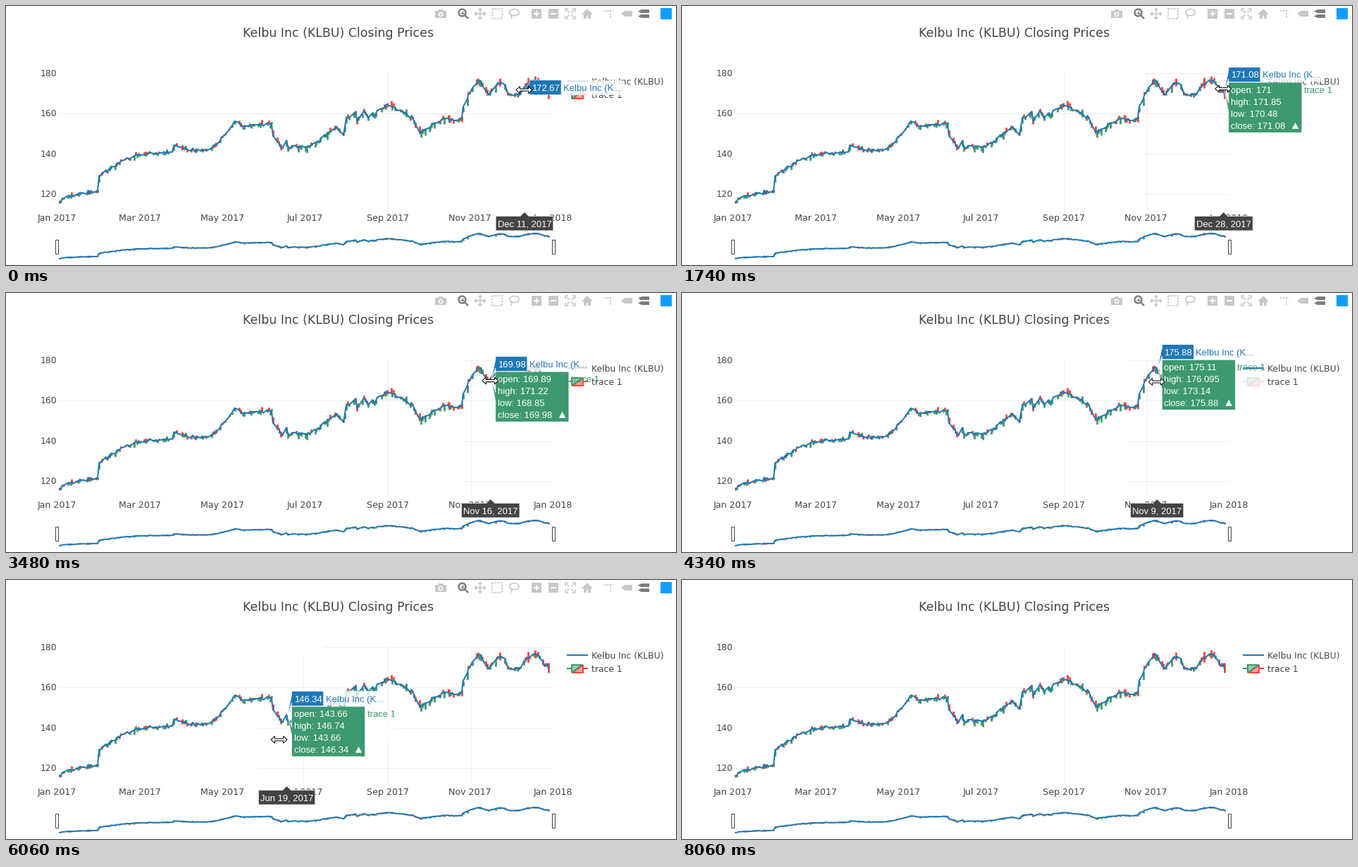
Animation of 951 by 369 pixels, one loop 8.54 s. Source, as a matplotlib script:

```python
import itertools

import matplotlib.pyplot as plt
import numpy as np
from matplotlib.animation import FuncAnimation
from matplotlib.collections import LineCollection, PolyCollection
from matplotlib.lines import Line2D
from matplotlib.patches import Polygon

W, H, DPI = 951, 369, 64
PX = 72 / DPI  # points per pixel
LOOP, TICK, STEP = 8540, 20, 145
FADE_START = 7480
COMPANY = "Kelbu Inc (KLBU)"
BLUE, GREEN, RED, INK = "#1f77b4", "#3d9970", "#ff4136", "#444444"
GRID, PALE, DARK = "#eeeeee", "#c7c7c7", "#7c7c7c"

# Main turns of the closing price: (day of the year, price)
TURNS = [
    (2, 116), (8, 119), (30, 121.5), (31, 128.7), (44, 135), (59, 139.4),
    (85, 140.8), (86, 143.8), (104, 141), (117, 144), (131, 156), (137, 153.3),
    (158, 154.8), (159, 149), (166, 142.6), (186, 143.2), (206, 153.2),
    (211, 149), (213, 157), (220, 160.5), (221, 155.8), (226, 161.2),
    (229, 157.5), (243, 164), (261, 158.6), (267, 150.6), (285, 157),
    (298, 157), (299, 163), (306, 172.5), (311, 176), (318, 169.2),
    (325, 175), (330, 174), (332, 169.5), (341, 169.2), (344, 172.67),
    (351, 176.42), (355, 175), (359, 170.6), (362, 169.2),
]
# Quotes the pointer rests on: open, high, low, close
QUOTES = {
    9: (118.77, 119.38, 118.3, 119.11),
    169: (143.66, 146.74, 143.66, 146.34),
    312: (175.11, 176.095, 173.14, 175.88),
    361: (171, 171.85, 170.48, 171.08),
}
# Pointer sweeps: start, end, day reached, whether the candle label shows
SWEEPS = [
    (0, 0, 344, False), (1180, 1740, 361, True), (2630, 2880, 351, False),
    (3030, 3640, 311, True), (3790, 3790, 312, True), (4490, 5350, 215, True),
    (5480, 5780, 169, True), (6200, 6890, 9, True), (7050, 7050, 2, True),
]


def day_x(day):
    return 72.25 + 1.928 * day


def price_y(price):
    return 95 + (180 - price) * 2.878


def slider_y(price):
    return 324 + (176.4 - price) * 0.594


def make_quotes():
    rng = np.random.default_rng(4)
    days = np.array([d for d in range(2, 363) if d % 7 not in (0, 6)])
    turn_days, turn_prices = zip(*TURNS)
    close = np.interp(days, turn_days, turn_prices)
    close += rng.normal(0, 0.45, len(days)) * ~np.isin(days, turn_days)
    change = np.diff(close, prepend=close[0])
    spread = 0.5 + 0.5 * days / 362
    opening = close - 0.4 * change + rng.normal(0, 1, len(days)) * spread
    reach = abs(rng.normal(0, 0.8, (2, len(days)))) * spread
    high = np.maximum(opening, close) + reach[0]
    low = np.minimum(opening, close) - reach[1]
    table = np.round(np.column_stack([opening, high, low, close]), 2)
    for day, quote in QUOTES.items():
        table[days == day] = quote
    return days, table


def make_poses():
    """Stepwise pointer stops: (time, row of the quote, candle label shown)."""
    poses, last = [], SWEEPS[0][2]
    for start, end, goal, candle in SWEEPS:
        count = round((end - start) / STEP) + 1
        for i, time in enumerate(np.linspace(start, end, count), 1):
            day = last + (goal - last) * i / count
            poses.append((time, np.argmin(abs(DAYS - day)), candle))
        last = goal
    return poses


def pointer(day):
    """The pointer runs down to the left, there slightly ahead of the label."""
    ahead = np.interp(day, (169, 312), (10.5, 0))
    return day_x(day) - ahead, np.interp(day, (9, 169, 312, 351), (284, 227.5, 126.5, 118))


DAYS, TABLE = make_quotes()
POSES = make_poses()

fig = plt.figure(figsize=(W / DPI, H / DPI), dpi=DPI, facecolor="white")
ax = fig.add_axes([0, 0, 1, 1])
ax.set(xlim=(0, W), ylim=(H, 0))
ax.axis("off")
layer = itertools.count(1)


def put(artist):
    artist.set_zorder(next(layer))
    ax.add_artist(artist)
    return artist


def strokes(paths, color, width=1, **style):
    return put(LineCollection(paths, colors=color, linewidths=width * PX, **style))


def shape(points, fill, edge="none", width=0, **style):
    return put(Polygon(points, closed=True, fc=fill, ec=edge, lw=width * PX, **style))


def write(x, y, text="", size=12.4, color=INK, ha="left", font="DejaVu Sans"):
    """Text whose capitals are centred on y."""
    return ax.text(x, y + 0.365 * size, text, fontsize=size * PX, color=color,
                   ha=ha, va="baseline", family=font, zorder=next(layer))


def hover_text(text="", color="white", ha="left"):
    return write(0, 0, text, 13, color, ha, "Liberation Sans")


def move(text, x, y):
    text.set_position((x, y + 0.365 * 13))


def box(x0, y0, x1, y1):
    return [(x0, y0), (x1, y0), (x1, y1), (x0, y1)]


def square(x, y, half):
    return box(x - half, y - half, x + half, y + half)


def disc(x, y, rx, ry=None):
    a = np.linspace(0, 2 * np.pi, 25)
    return np.column_stack([x + rx * np.cos(a), y + (ry or rx) * np.sin(a)])


def grid_lines(left):
    """Faint lines; most of them show only right of `left`."""
    lines = [[(541.5, 92), (541.5, 290)], [(76, 152.5), (776, 152.5)]]
    if left < W:
        for price in (180, 140, 120):
            y = np.floor(price_y(price)) + 0.5
            lines.append([(max(left, 450 if price == 180 else 76), y), (776, y)])
        for x in (186.5, 304.5, 421.5, 659.5):
            if x > left:
                lines.append([(x, 92 if x > 450 else 108), (x, 290)])
    return lines


def draw_series(to_y, width):
    xs = day_x(DAYS)
    bars = [[(x, to_y(low)), (x, to_y(high))]
            for x, (_, high, low, _) in zip(xs, TABLE)]
    strokes(bars, [GREEN if q[3] >= q[0] else RED for q in TABLE], width)
    put(Line2D(xs, to_y(TABLE[:, 3]), color=BLUE, lw=2 * PX,
               solid_joinstyle="round"))


def draw_legend():
    strokes([[(796, 107), (826, 107)]], BLUE, 2)
    strokes([[(796, 126), (803, 126)], [(819, 126), (826, 126)]], [GREEN, RED], 2)
    shape([(819, 121), (819, 132), (804, 132)], "#ffa09a", RED, 2)
    shape([(803, 132), (803, 121), (818, 121)], "#9eccb7", GREEN, 2)
    write(831, 107, COMPANY)
    write(831, 126.5, "trace 1")


def tag(x, y, half):
    return [(x, y), (x + 5, y - half), (x + 16, y - half),
            (x + 16, y + half), (x + 5, y + half)]


def draw_modebar():
    mid = 11
    fills = [
        (box(609, 7, 625, 17), PALE), (box(614, 5, 620, 8), PALE),
        (disc(617, 12, 3.4), "white"), (disc(617, 12, 1.8), PALE),
        (square(753, mid, 7), PALE), (square(777, mid, 7), PALE),
        ([(817, 12), (825, 4), (833, 12)], PALE),
        (box(820, 11, 830, 18), PALE), (box(824, 14, 826, 18), "white"),
        (tag(873, mid, 4), PALE),
        (tag(897, 7.5, 2.5), DARK), (tag(897, 14.5, 2.5), DARK),
        (square(937, mid, 8), "#119dff"),
    ]
    polys, colors = zip(*fills)
    parts = [put(PolyCollection(polys, facecolors=colors, edgecolors="none"))]

    def bar(x, y, dx, dy):
        return [(x - dx, y - dy), (x + dx, y + dy)]

    parts.append(strokes([disc(647.5, 9.5, 5), [(651, 13), (656, 18)]], DARK, 2.4))
    parts.append(strokes([bar(647.5, 9.5, 2.5, 0), bar(647.5, 9.5, 0, 2.5)], DARK, 1.4))
    parts.append(strokes([bar(753, mid, 4, 0), bar(753, mid, 0, 4),
                          bar(777, mid, 4, 0)], "white", 2))

    pale = [bar(673, mid, 7, 0), bar(673, mid, 0, 7), disc(721.5, 9, 6.8, 4.6),
            [(716, 12), (718, 14.5), (717, 18)]]
    for dx, dy in ((1, 0), (-1, 0), (0, 1), (0, -1)):
        tip = np.array([673 + 7.5 * dx, mid + 7.5 * dy])
        back, side = np.array([dx, dy]) * 2.5, np.array([dy, dx]) * 2.5
        pale.append([tip - back + side, tip, tip - back - side])
    for sign in itertools.product((-1, 1), repeat=2):
        corner = np.array([(3, 7), (7, 7), (7, 3)]) * sign + (801, mid)
        pale += [corner, np.array([(1.5, 1.5), (5, 5)]) * sign + (801, mid)]
    parts.append(strokes(pale, PALE, 1.6))
    dotted = [square(697, mid, 7) + [(690, 4)],
              [(849, 6.5), (862, 6.5)], [(858, 6), (858, 18)]]
    parts.append(strokes(dotted, PALE, 1.8, linestyles=(0, (1.3, 1.0))))
    return parts


class HoverLabel:
    """A pointed box with a series name on its right."""

    def __init__(self, name, name_width, width, height):
        self.width, self.height, self.name_width = width, height, name_width
        self.veil = shape(box(0, 0, 1, 1), "white", alpha=0.8)
        self.body = shape(box(0, 0, 1, 1), BLUE, "white", 0.6)
        self.name = hover_text(name, BLUE)
        self.artists = [self.veil, self.body, self.name]

    def place(self, x, y, shift, color):
        left, mid, half = x + 6, y + shift, self.height / 2
        right = left + self.width
        self.body.set_xy([(x, y), (left, mid + 6), (left, mid + half),
                          (right, mid + half), (right, mid - half),
                          (left, mid - half), (left, mid - 6)])
        self.body.set_facecolor(color)
        self.veil.set_xy(box(right, mid - 10.5, right + self.name_width, mid + 10.5))
        self.name.set_color(color)
        row = mid - half + 10.5
        move(self.name, right + 3, row)
        return left, right, row


grid = strokes(grid_lines(W), GRID)
draw_series(price_y, 2.8)
write(471.5, 37.5, f"{COMPANY} Closing Prices", 17.4, ha="center")
for value in range(120, 181, 20):
    write(72, price_y(value), str(value), ha="right")
for i, month in enumerate(("Jan", "Mar", "May", "Jul", "Sep", "Nov", "Jan")):
    write(72.3 + 117.3 * i, 301, f"{month} {2017 + i // 6}", 12.6, ha="center")
draw_series(slider_y, 3)
for x in (72, 777):
    shape(box(x - 2.5, 332.5, x + 2, 352.5), "white", INK, 1)
draw_legend()
modebar = draw_modebar()

date_box = shape(box(0, 0, 1, 1), INK, "white", 0.6)
date_text = hover_text(ha="center")
line_label = HoverLabel(COMPANY[:12] + "...", 88, 45, 21)
line_value = hover_text()
candle_label = HoverLabel("trace 1", 45, 104, 71.5)
candle_rows = [hover_text() for _ in range(4)]
trend = shape(box(0, 0, 1, 1), "white")
HALF_CURSOR = np.array([(6, -1.5), (6, -5), (11.5, 0), (6, 5), (6, 1.5)])
CURSOR = np.vstack([HALF_CURSOR, -HALF_CURSOR])
cursor = shape(CURSOR, "white", "black", 1)

candle_parts = [*candle_label.artists, *candle_rows, trend]
hover_parts = [date_box, date_text, *line_label.artists, line_value, cursor]


def show_date(day):
    date = (np.datetime64("2017-01-01") + int(day)).astype(object)
    date_text.set_text(f"{date:%b} {date.day}, {date.year}")
    x, top, bottom = day_x(day) + 0.5, 299.5, 320
    move(date_text, x, 310)
    half = date_text.get_window_extent().width / 2 + 2.5
    date_box.set_xy([(x, top - 6), (x + 6, top), (x + half, top), (x + half, bottom),
                     (x - half, bottom), (x - half, top), (x - 6, top)])


def show_quote(index, candle):
    quote = TABLE[index]
    x, y = day_x(DAYS[index]) + 1.6, price_y(quote[3])
    left, _, row = line_label.place(x, y, -23 if candle else 0, BLUE)
    line_value.set_text(f"{quote[3]:.6g}")
    move(line_value, left + 3, row)
    if not candle:
        return
    rising = quote[3] >= quote[0]
    left, right, row = candle_label.place(x, y, 24, GREEN if rising else RED)
    names = ("open", "high", "low", "close")
    for i, (text, name, value) in enumerate(zip(candle_rows, names, quote)):
        text.set_text(f"{name}: {value:.6g}")
        move(text, left + 3, row + 17 * i)
    tip = -4.5 if rising else 4.5
    mid = row + 51
    trend.set_xy([(right - 14, mid - tip), (right - 4.5, mid - tip),
                  (right - 9.25, mid + tip)])


def update(frame):
    time = frame * TICK + TICK / 2
    hovering = time < FADE_START
    past = [pose for pose in POSES if pose[0] <= time]
    _, index, candle = past[-1]
    for part in hover_parts:
        part.set_visible(hovering)
    for part in candle_parts:
        part.set_visible(hovering and candle)

    left = W
    if hovering:
        show_date(DAYS[index])
        show_quote(index, candle)
        cursor.set_xy(CURSOR + pointer(DAYS[index]))
        if len(past) > 1:
            left = min(655, min(day_x(DAYS[pose[1]]) for pose in past) - 40)
    grid.set_segments(grid_lines(max(left, 76)))

    faded = 0 if hovering else min(5, (time - FADE_START) // STEP + 1)
    for part in modebar:
        part.set_alpha(1 - faded / 5)
    return []


anim = FuncAnimation(fig, update, frames=LOOP // TICK, interval=TICK,
                     repeat=True, repeat_delay=0, blit=False)
plt.show()
```
